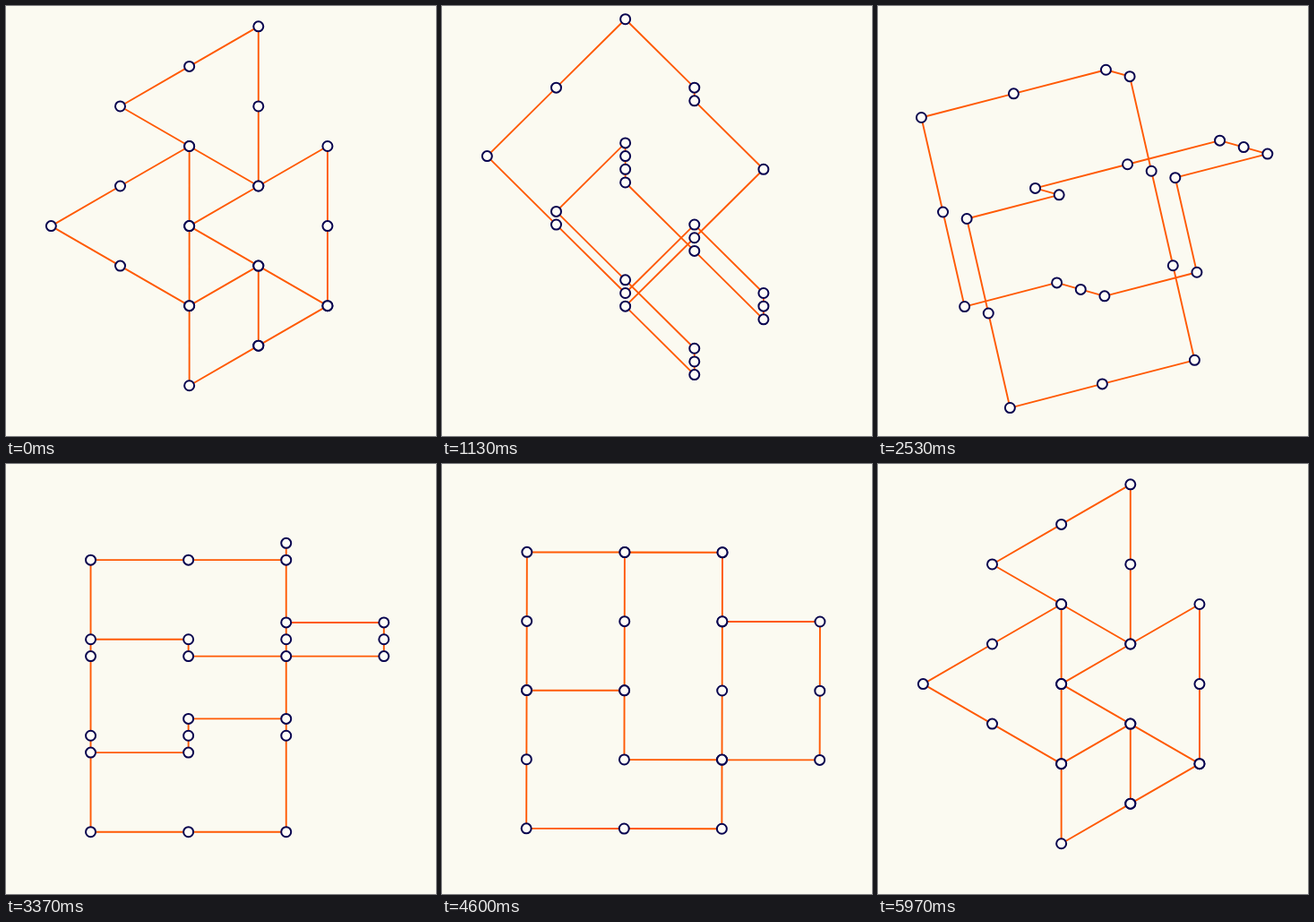
Recreate the animation shown at these times as an HTML page with a canvas. Size 480x480 px, loop 6010 ms.

```html
<!DOCTYPE html>
<html>
<head>
<meta charset="utf-8">
<style>
html, body { margin: 0; width: 100%; height: 100%; overflow: hidden; background: #fbfaf1; }
canvas { display: block; }
</style>
</head>
<body>
<canvas id="stage" width="480" height="480"></canvas>
<script>
const ctx = document.getElementById('stage').getContext('2d');
const LOOP = 6010, SEGMENT = 1500, LEAD = 9, UNIT = 109.1, CENTER = 240;

// Closed walk on a cubic lattice; lower case steps backwards along an axis.
const WALK = 'BBBaabbAcAACCaBaccabbAAC';

// Each pose lists the 3D directions of the axes A, B and C.
const s = Math.SQRT1_2, r = Math.sqrt(1 / 6), q = Math.sqrt(1 / 3);
const POSES = [
  [[-s, r, -q], [0, 2 * r, q], [s, r, -q]],
  [[-s, -s, 0], [0, 0, -1], [s, -s, 0]],
  [[1, 0, 0], [0, 1, 0], [0, 0, 1]],
  [[1, 0, 0], [0, -s, s], [0, -s, -s]]
];

const dot = (u, v) => u[0] * v[0] + u[1] * v[1] + u[2] * v[2];
const cross = (u, v) => [
  u[1] * v[2] - u[2] * v[1],
  u[2] * v[0] - u[0] * v[2],
  u[0] * v[1] - u[1] * v[0]
];
const ease = p => p ** 4 * (35 - 84 * p + 70 * p * p - 20 * p ** 3);

// Axis and angle of the single rotation that carries one pose to the next.
const TURNS = POSES.map((from, i) => {
  const to = POSES[(i + 1) % POSES.length];
  const sum = [0, 0, 0];
  let trace = 0;
  from.forEach((v, k) => {
    cross(v, to[k]).forEach((c, j) => sum[j] += c);
    trace += dot(v, to[k]);
  });
  const length = Math.hypot(...sum);
  return { axis: sum.map(c => c / length), angle: Math.acos((trace - 1) / 2) };
});

function rotate(v, axis, angle) {
  const cos = Math.cos(angle), sin = Math.sin(angle);
  const side = cross(axis, v), along = dot(axis, v) * (1 - cos);
  return v.map((c, j) => c * cos + side[j] * sin + axis[j] * along);
}

function vertices(t) {
  const u = (t + LEAD) / SEGMENT;
  const i = Math.floor(u) % POSES.length;
  const { axis, angle } = TURNS[i];
  const dirs = POSES[i].map(v => rotate(v, axis, angle * ease(u % 1)));
  let x = 0, y = 0;
  const points = [...WALK].map(step => {
    const dir = dirs['ABC'.indexOf(step.toUpperCase())];
    const sign = step < 'a' ? UNIT : -UNIT;
    return [x += sign * dir[0], y += sign * dir[1]];
  });
  const mean = j => points.reduce((sum, p) => sum + p[j], 0) / points.length;
  const mx = mean(0), my = mean(1);
  return points.map(p => [p[0] - mx + CENTER, p[1] - my + CENTER]);
}

function draw(now) {
  const points = vertices(now % LOOP);
  ctx.fillStyle = '#fbfaf1';
  ctx.fillRect(0, 0, 480, 480);

  ctx.beginPath();
  points.forEach(p => ctx.lineTo(...p));
  ctx.closePath();
  ctx.lineJoin = 'round';
  ctx.lineWidth = 1.9;
  ctx.strokeStyle = '#ff5a05';
  ctx.stroke();

  ctx.lineWidth = 2;
  ctx.strokeStyle = '#08044f';
  ctx.fillStyle = '#fefdf8';
  for (const [x, y] of points) {
    ctx.beginPath();
    ctx.arc(x, y, 5.5, 0, 2 * Math.PI);
    ctx.fill();
    ctx.stroke();
  }
  requestAnimationFrame(() => draw(performance.now() - start));
}

const start = performance.now();
draw(0);
</script>
</body>
</html>
```
